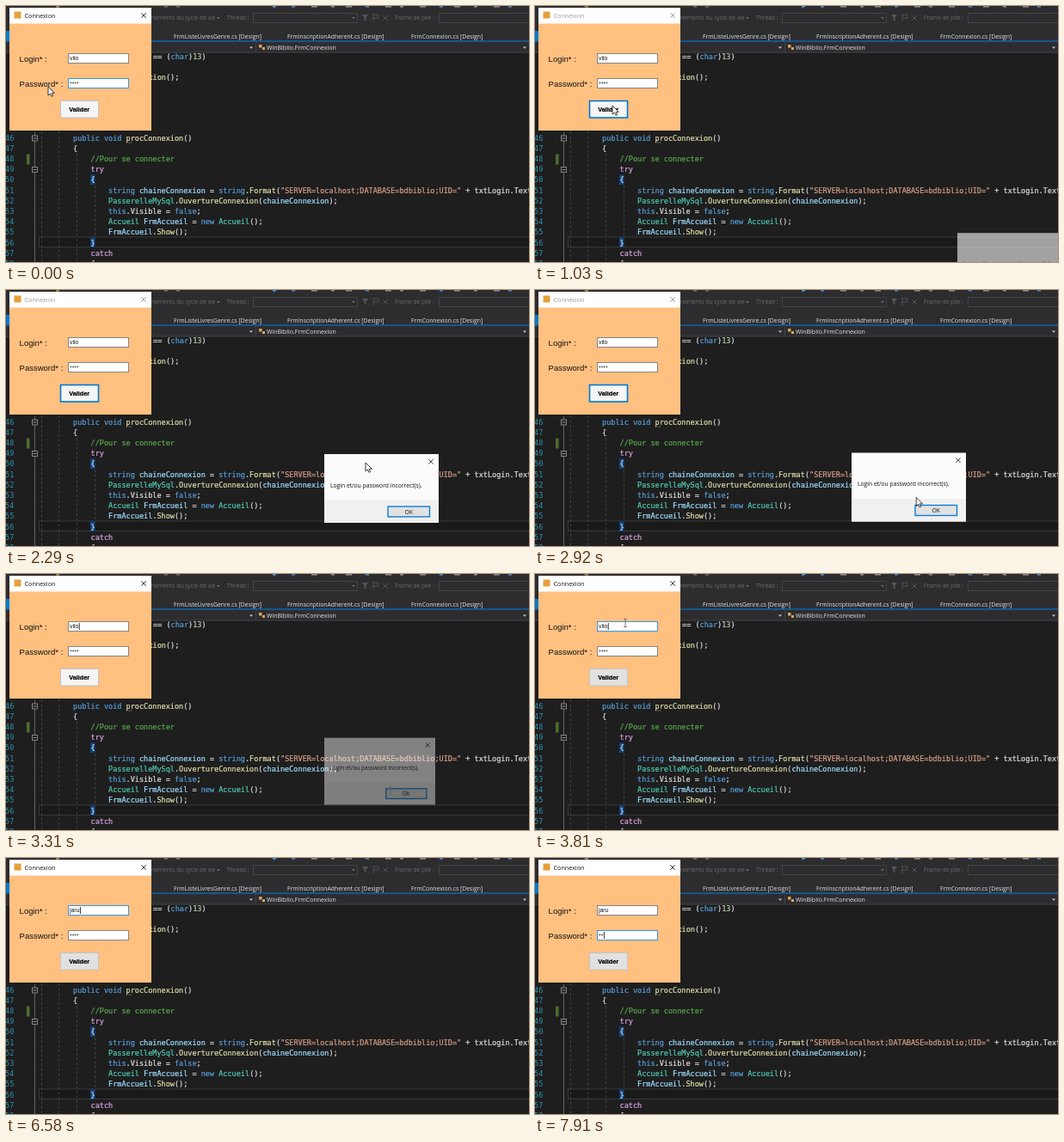
An HTML page for the animation above (8000 ms loop, 608 px wide and 298 px high).

```html
<!DOCTYPE html>
<html lang="fr">
<head>
<meta charset="utf-8">
<title>Connexion</title>
<style>
html, body { margin: 0; width: 100%; height: 100%; overflow: hidden; background: #1e1e1e; }
svg { display: block; width: 608px; height: 298px; }
text { white-space: pre; }
.ui { font-family: "Open Sans", "Noto Sans", sans-serif; }
.mono { font: 8.53px "DejaVu Sans Mono", monospace; }
.form { font-family: "Liberation Sans", Arial, sans-serif; }
.code { color: #dcdcdc; }
.code, .code tspan { fill: currentColor; stroke: currentColor; stroke-width: .22px; }
.kw { color: #569cd6; } .ctl { color: #d8a0df; } .cls { color: #4ec9b0; } .fn { color: #dcdcaa; }
.var { color: #9cdcfe; } .str { color: #d69d85; } .com { color: #57a64a; } .num { color: #b5cea8; }
</style>
</head>
<body>
<svg id="stage" viewBox="0 0 608 298"></svg>
<script>
const LOOP = 8000, FRAME = 125.6, LINE = 12.2;
const BLUE = '#3d95df', GRAY = '#858585';
const rect = (x, y, w, h, fill, more = '') =>
  `<rect x="${x}" y="${y}" width="${w}" height="${h}" fill="${fill}" ${more}/>`;
const box = (x, y, w, h, fill, stroke, more = '') =>
  rect(x + .5, y + .5, w - 1, h - 1, fill, `stroke="${stroke}" ${more}`);
const path = (d, stroke, more = '') => `<path d="${d}" fill="none" stroke="${stroke}" ${more}/>`;
const label = (x, y, size, fill, s, cls = 'ui', more = '') =>
  `<text class="${cls}" x="${x}" y="${y}" font-size="${size}" fill="${fill}" ${more}>${s}</text>`;
const arrow = (x, y, fill) => `<path d="M${x} ${y}h4l-2 2.2z" fill="${fill}"/>`;
const cross = (x, y, r, more = '') =>
  path(`M${x - r} ${y - r}l${2 * r} ${2 * r}M${x + r} ${y - r}l${-2 * r} ${2 * r}`, '#222', `stroke-width=".9" ${more}`);

const WORDS = {
  kw: 'public void string this false new char', ctl: 'try catch',
  cls: 'PasserelleMySql Accueil', fn: 'procConnexion nnexion Format OuvertureConnexion Show',
  var: 'chaineConnexion FrmAccueil', num: '13'
};
const kind = {};
for (const k in WORDS) for (const w of WORDS[k].split(' ')) kind[w] = k;

function code(x, y, s) {
  const html = s.replace(/\/\/.*|"[^"]*"|\w+/g, w => {
    const k = w[0] === '"' ? 'str' : w[0] === '/' ? 'com' : kind[w];
    return k ? `<tspan class="${k}">${w}</tspan>` : w;
  });
  return `<text class="mono code" x="${x}" y="${y}">${html}</text>`;
}

const LINES = [
  [0, 'public void procConnexion()'], [0, '{'], [1, '//Pour se connecter'], [1, 'try'], [1, '{'],
  [2, 'string chaineConnexion = string.Format("SERVER=localhost;DATABASE=bdbiblio;UID=" + txtLogin.Text'],
  [2, 'PasserelleMySql.OuvertureConnexion(chaineConnexion);'], [2, 'this.Visible = false;'],
  [2, 'Accueil FrmAccueil = new Accueil();'], [2, 'FrmAccueil.Show();'], [1, '}'], [1, 'catch'], [1, '{']
];

function editor() {
  const guide = (x, y, end) => path(`M${x} ${y}V${end}`, '#4a4a4a', 'stroke-width=".8" stroke-dasharray="3 2.5"');
  const fold = y => box(30, y, 7, 7, '#1e1e1e', '#999', 'stroke-width=".8"') + path(`M31.5 ${y + 3.5}h4`, '#aaa', 'stroke-width=".8"');
  return rect(0, 0, 608, 298, '#1e1e1e') +
    box(38, 268.5, 572, 12.5, '#191919', '#3a3a3c') +
    rect(98, 196.5, 5.5, 11.5, '#0e4583') + rect(98, 269.5, 5.5, 11.5, '#0e4583') +
    guide(41.5, 146, 298) + guide(61.5, 146, 298) + guide(82.5, 172, 298) + guide(103.5, 209, 269) +
    path('M33.5 147V298', '#777', 'stroke-width=".8"') + fold(150.5) + fold(187) +
    rect(24, 172.5, 3.5, 12, '#4c6e2c') +
    code(171, 62, '== (char)13)') + code(150, 86, 'nnexion();') +
    path('M140 159h6', '#aaa', 'stroke-dasharray="1 1.5"') +
    LINES.map(([indent, s], i) => {
      const y = 156.6 + i * LINE;
      return code(78 + indent * 20.5, y, s) + label(-1, y, 8.5, '#2b91af', 46 + i, 'mono');
    }).join('');
}

function toolbar() {
  const dim = '#6c6c6c';
  const icon = (x, w, fill) => rect(x, 0, w, 1.6, fill);
  let s = rect(0, 0, 608, 42, '#2d2d30') +
    icon(58, 4, '#a88a52') + icon(184, 4, dim) + icon(198, 4, dim);
  for (let i = 0; i < 13; i++) s += icon(332 + i * 21 + i % 3 * 2, 4 + i % 2 * 3, i % 4 ? '#888' : '#4d86b5');
  s += '<path d="M310 0h5l-4 2.500z" fill="#4aa3df"/>' +
    label(169, 16.2, 6.7, dim, 'nements du cycle de vie') + arrow(245, 13, dim) +
    label(257, 16.2, 6.7, dim, 'Thread :') +
    box(287, 8, 122, 12, '#2d2d30', '#434346') + arrow(402, 13, dim) +
    '<path d="M414 10h7l-2.7 3.5v4l-1.6-1v-3z" fill="#585858"/>' +
    path('M427 9v9M427 10h6v4h-6M438 17l6-6M438 11l6 6', '#505050') +
    label(452, 16.2, 6.7, dim, 'Frame de pile :') +
    box(503, 8, 107, 12, '#2d2d30', '#434346');
  [[195, 'FrmListeLivresGenre'], [327, 'FrmInscriptionAdherent'], [471, 'FrmConnexion']]
    .forEach(([x, name]) => s += label(x, 37.6, 6.85, '#e6e6e6', name + '.cs [Design]'));
  return s + rect(0, 29, 4, 12, '#007acc') + rect(0, 40.3, 608, 1.4, '#0a6ab0') +
    rect(0, 42, 608, 12, '#2d2d30') + path('M290.5 43v11M0 54h608', '#434346') +
    arrow(283, 47.5, '#ccc') + arrow(601, 47.5, '#ccc') +
    rect(294, 45, 3.5, 3.5, '#d7a45c') + rect(298, 48, 3, 3, '#d7a45c') +
    label(303, 51, 7, '#e6e6e6', 'WinBiblio.FrmConnexion');
}

function loginForm() {
  return rect(4, 2, 165, 143, '#ffc080') + rect(4, 2, 165, 18.5, '#fff') +
    rect(9.5, 6.5, 8, 8, '#e5a03c') +
    label(21.5, 13.6, 7.2, '#111', 'Connexion', 'ui', 'id="title"') + cross(160, 11, 2.8, 'id="close"') +
    label(15.6, 64.5, 9.5, '#111', 'Login* :', 'form') + label(15.6, 93.5, 9.5, '#111', 'Password* :', 'form') +
    box(72, 55, 71, 12, '#fff', GRAY, 'id="loginBox"') + rect(74, 57, 11.5, 8, '#0078d7', 'id="mark"') +
    label(74, 63.4, 6.8, '#111', '', 'form', 'id="login"') +
    box(72, 84, 71, 12, '#fff', GRAY, 'id="passBox"') +
    label(74, 93, 6.8, '#333', '', 'form', 'id="pass"') +
    rect(0, 0, .8, 8, '#000', 'id="caret"') +
    box(63, 110, 45, 20.5, '#f5f5f5', '#c4c4c4', 'id="button"') +
    label(73.2, 122.9, 7.3, '#000', 'Valider', 'form', 'font-weight="700" stroke="#000" stroke-width=".2"');
}

const dialog = `<g id="dialog">${rect(0, 0, 133, 80, '#fbfbfb')}${rect(0, 53.5, 133, 26.5, '#f0f0f0')}` +
  cross(124, 8.8, 2.7) + label(7, 38.6, 6.75, '#111', 'Login et/ou password incorrect(s).') +
  box(73.5, 60.5, 49.5, 13, '#e1e1e1', '#0078d7', 'stroke-width="1.3"') +
  label(93.5, 69.5, 6.8, '#111', 'OK') + '</g>';

const pointers = '<path id="arrow" d="M0 0V10L2.4 7.9L4 11.3L5.6 10.6L4.1 7.3H7.3Z" fill="#fff" stroke="#111" stroke-width=".8"/>' +
  path('M-1.8-4.5H1.8M0-4.5V4.5M-1.8 4.5H1.8', '#666', 'id="beam" stroke-width=".9"');

stage.innerHTML = editor() + toolbar() + loginForm() + dialog + pointers;
const el = id => document.getElementById(id);
const set = (id, attrs) => { for (const k in attrs) el(id).setAttribute(k, attrs[k]); };
const show = (id, on) => set(id, { display: on ? 'inline' : 'none' });

// pointer track: step, x, y
const TRACK = [
  [0, 49, 94], [1, 62, 101], [6, 90, 116], [9, 90, 116], [10, 169, 146], [11, 465, 223],
  [12, 537, 273], [15, 440, 212], [17, 419, 202], [18, 418, 201], [19, 416, 199.5], [24, 450, 252],
  [26, 447, 252], [27, 330, 180], [29, 100, 85], [30, 105, 57], [32, 64, 60], [34, 66, 64],
  [37, 121, 66], [39, 108, 78], [41, 98, 62], [42, 66, 66], [43, 53, 65], [44, 58, 40], [64, 58, 40]
];
function pointerAt(n) {
  const i = TRACK.findIndex(p => p[0] > n);
  const [a, ax, ay] = TRACK[i - 1], [b, bx, by] = TRACK[i];
  const u = (n - a) / (b - a);
  return [ax + (bx - ax) * u, ay + (by - ay) * u];
}

const count = (t, times) => times.filter(v => t >= v).length;

function draw(t) {
  const n = Math.floor(t / FRAME);
  const [x, y] = pointerAt(n);

  // message box: pops up, is dragged, fades out
  const [dx, dy] = pointerAt(Math.min(19, Math.max(12, n)));
  const opening = t < 1150, closing = t >= 3310;
  const scale = opening || closing ? .97 : 1;
  show('dialog', t >= 1030 && t < 3430);
  set('dialog', {
    transform: `translate(${dx - 48 + 66.5 * (1 - scale)} ${dy - 10 + 40 * (1 - scale)}) scale(${scale})`,
    opacity: opening ? .6 : closing ? .45 : 1
  });

  const idle = t >= 1030 && t < 3190;
  set('title', { fill: idle ? '#999' : '#111' });
  set('close', { stroke: idle ? '#999' : '#222' });

  const onButton = t >= 780 && t < 3190;
  const onLogin = t >= 3190 && t < 6700;
  const onPass = t < 780 || t >= 6700;
  set('button', {
    fill: t < 3430 ? '#f5f5f5' : '#e1e1e1',
    stroke: onButton ? '#0078d7' : '#c4c4c4', 'stroke-width': onButton ? 1.6 : 1
  });
  set('loginBox', { stroke: onLogin && t >= 3430 ? BLUE : GRAY });
  set('passBox', { stroke: onPass ? BLUE : GRAY });

  const marked = t >= 5280 && t < 6100;
  show('mark', marked);
  set('login', { fill: marked ? '#fff' : '#111' });
  el('login').textContent = t < 6100 ? 'vilo' : 'jaru'.slice(0, count(t, [6100, 6220, 6340, 6460]));
  const stars = 4 - count(t, [7100, 7240, 7360, 7510]) + count(t, [7790, 7910]);
  el('pass').textContent = '*'.repeat(stars);

  const field = onLogin ? 'login' : 'pass';
  show('caret', t >= 3190 && !marked);
  set('caret', { x: 74.6 + el(field).getComputedTextLength(), y: onLogin ? 57 : 86 });

  const beam = n >= 25 && n < 43;
  show('beam', beam);
  show('arrow', !beam && t < 6100);
  set(beam ? 'beam' : 'arrow', { transform: `translate(${x} ${y})` });
}

function tick() {
  draw(performance.now() % LOOP);
  requestAnimationFrame(tick);
}
tick();
</script>
</body>
</html>
```
